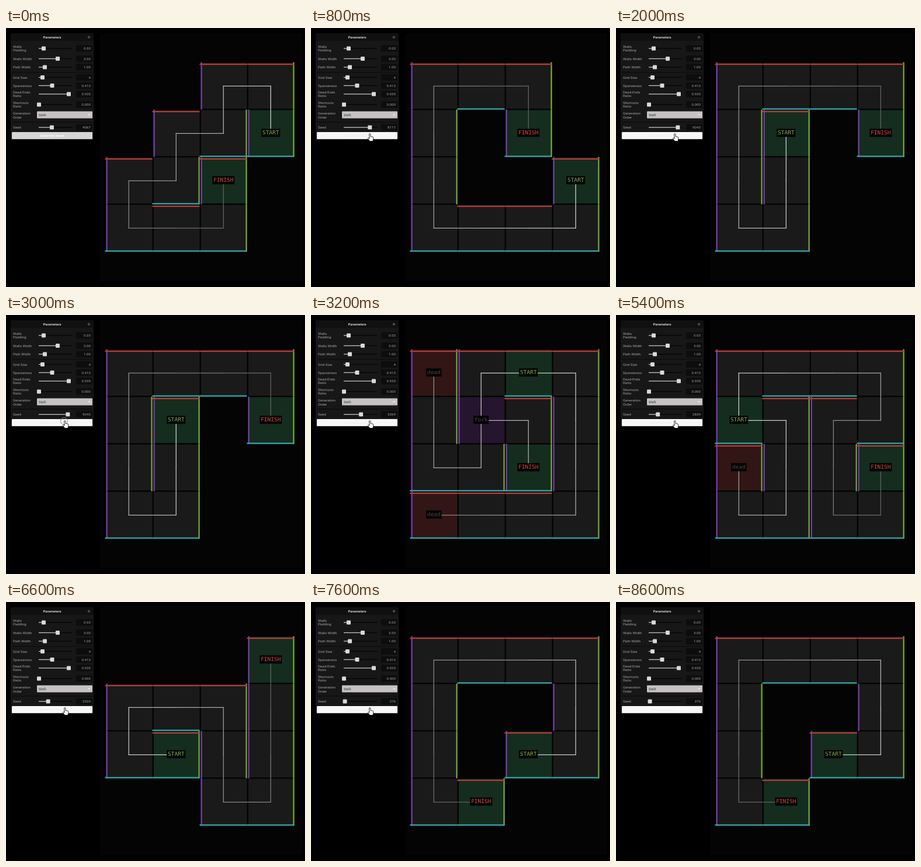
Recreate the animation shown at these times as an HTML page with a canvas. Size 512 px wide and 443 px high, loop 8800 ms.

```html
<!DOCTYPE html>
<html lang="en">
<head>
<meta charset="utf-8">
<title>Maze generator</title>
<style>
html, body { margin: 0; width: 100%; height: 100%; overflow: hidden; background: #000; }
canvas { display: block; }
</style>
</head>
<body>
<canvas id="stage" width="512" height="443"></canvas>
<script>
const ctx = document.getElementById('stage').getContext('2d');
const LOOP = 8800, PITCH = 81;
const STEP = { U: [0, -1], R: [1, 0], D: [0, 1], L: [-1, 0] };
const SANS = 'Roboto, "Liberation Sans", sans-serif';
const MONO = '"DejaVu Sans Mono", monospace';
const TINT = { START: '#142d1f', FINISH: '#142d1f', dead: '#311615', fork: '#26152f' };
const INK = { START: '#82b33e', FINISH: '#d84b32', dead: '#484848', fork: '#484848' };

// Each route: column, row, moves, label at its end, depth of its first cell
const MAZES = [
  { at: 0, seed: 4067, routes: [[3, 1, 'ULDLDLDRRU', 'FINISH', 0]] },
  { at: 800, seed: 8117, routes: [[3, 2, 'DLLLUUURRD', 'FINISH', 0]] },
  { at: 2000, seed: 9043, routes: [[1, 1, 'DDLUUURRRD', 'FINISH', 0]] },
  { at: 3200, seed: 5369, fork: '1,1', routes: [
    [2, 0, 'LDRD', 'FINISH', 0], [1, 1, 'DLUU', 'dead', 2], [2, 0, 'RDDDLLL', 'dead', 0]] },
  { at: 4200, seed: 6217, routes: [[1, 1, 'RULLDDRDRR', 'FINISH', 0]] },
  { at: 5400, seed: 2839, routes: [
    [0, 1, 'URRRDLDDRU', 'FINISH', 0], [0, 1, 'RDDLU', 'dead', 0]] },
  { at: 6600, seed: 2924, routes: [[1, 2, 'LURRDDRUUU', 'FINISH', 0]] },
  { at: 7600, seed: 376, routes: [[2, 2, 'RUULLLDDDR', 'FINISH', 0]] }
].map(carve);

// time, kind, tip x, tip y
const POINTER = [
  [0], [200, 'hand', 129, 188], [400, 'hand', 101, 180], [600, 'hand', 100, 181],
  [7800, 'hand', 102, 181], [8000, 'arrow', 456, 346], [8200, 'arrow', 471, 396],
  [8400, 'arrow', 492, 436], [8600]
];
const CLICKS = [1800, 3000, 4000, 5200, 6400];

const SLIDERS = [
  [35, 64.5, '0.03', 'Walls', 'Padding'], [52.5, 88.5, '3.00', 'Walls Width'],
  [67, 66.5, '1.00', 'Path Width'], [84.5, 62.5, '4', 'Grid Size'],
  [98.5, 79, '0.413', 'Sparseness'], [113, 107.5, '0.935', 'Dead-Ends', 'Ratio'],
  [131, 56.5, '0.000', 'Shortcuts', 'Ratio']
];

function carve({ at, seed, fork, routes }) {
  const cells = new Map(), lines = [];
  const cell = (x, y) => {
    const key = x + ',' + y;
    if (!cells.has(key)) cells.set(key, { x, y, open: '', label: '' });
    return cells.get(key);
  };
  for (const [sx, sy, moves, end, first] of routes) {
    let here = cell(sx, sy), depth = first;
    if (!depth) here.label = 'START';
    for (const m of moves) {
      const next = cell(here.x + STEP[m][0], here.y + STEP[m][1]);
      here.open += m;
      next.open += 'DLUR'['URDL'.indexOf(m)];
      lines.push([here, next, depth++]);
      here = next;
    }
    here.label = end;
  }
  if (fork) cells.get(fork).label = 'fork';
  return { at, seed, cells: [...cells.values()], lines };
}

function box(x, y, w, h, color) {
  ctx.fillStyle = color;
  ctx.fillRect(x, y, w, h);
}

function rounded(x, y, w, h, r, color) {
  ctx.fillStyle = color;
  ctx.beginPath();
  ctx.roundRect(x, y, w, h, r);
  ctx.fill();
}

function text(str, x, y, color, font, align = 'left') {
  ctx.font = font;
  ctx.fillStyle = color;
  ctx.textAlign = align;
  ctx.fillText(str, x, y);
}

function drawMaze({ cells, lines }) {
  box(161, 9, 346, 424, '#040404');
  for (const { x, y, label } of cells)
    box(172 + x * PITCH, 59.5 + y * PITCH, 78.5, 78.5, TINT[label] || '#1a1a1a');

  for (const { x, y, open } of cells) {
    const left = 169.5 + x * PITCH, top = 58.5 + y * PITCH;
    if (!open.includes('L')) box(left + 2, top, 2.2, PITCH, '#7d3fb4');
    if (!open.includes('R')) box(left + 79, top, 2.2, PITCH, '#78ab38');
    if (!open.includes('U')) box(left, top + 2.4, PITCH, 2.2, '#b83a37');
    if (!open.includes('D')) box(left, top + 78.9, PITCH, 2.2, '#36adaf');
  }

  const px = c => 210.3 + c.x * PITCH, py = c => 99.3 + c.y * PITCH;
  ctx.lineWidth = 1.3;
  ctx.lineCap = 'square';
  for (const [a, b, depth] of lines) {
    const g = 205 - depth * 12;
    ctx.strokeStyle = `rgb(${g},${g},${g})`;
    ctx.beginPath();
    ctx.moveTo(px(a), py(a));
    ctx.lineTo(px(b), py(b));
    ctx.stroke();
  }

  for (const c of cells.filter(c => c.label)) {
    const w = c.label.length * 5.72 + 3.5;
    box(px(c) - w / 2, py(c) - 8, w, 14, '#040404');
    text(c.label, px(c), py(c) + 1.6, INK[c.label], '9.5px ' + MONO, 'center');
  }
}

function drawSlider([y, knob, value, ...names]) {
  names.forEach((n, i) =>
    text(n, 12, y + 2.3 + (i - (names.length - 1) / 2) * 6.3, '#a2a2a2', '6.2px ' + SANS));
  box(56, y - 0.7, 57, 1.4, '#050505');
  box(56, y - 0.7, knob - 56, 1.4, '#bcbcbc');
  rounded(knob - 3.5, y - 3.5, 7, 7, 1.2, '#d9d9d9');
  rounded(120, y - 5.5, 28, 11, 1, '#0d0d0d');
  text(value, 145, y + 2.4, '#a2a2a2', '6.2px ' + SANS, 'right');
}

function drawPanel(seed, lit) {
  rounded(8, 9, 142, 183, 2, '#171717');
  rounded(8, 9, 142, 13, 2, '#101010');
  text('Parameters', 79, 18, '#ededed', '500 6px ' + SANS, 'center');
  ctx.strokeStyle = '#777';
  ctx.lineWidth = 1;
  ctx.beginPath();
  ctx.arc(142, 15.8, 1.5, 0, 7);
  ctx.stroke();

  box(10, 75.5, 138, 1, '#0a0a0a');
  box(10, 160.5, 138, 1, '#0a0a0a');
  SLIDERS.forEach(drawSlider);
  drawSlider([170, 56 + seed * 0.00552, String(seed), 'Seed']);

  text('Generation', 12, 148.2, '#a2a2a2', '6.2px ' + SANS);
  text('Order', 12, 154.5, '#a2a2a2', '6.2px ' + SANS);
  rounded(53, 142.5, 95, 12, 1, '#c6c2c3');
  text('Shift', 56, 150.8, '#333', '6.2px ' + SANS);
  ctx.fillStyle = '#eee';
  ctx.beginPath();
  ctx.moveTo(140, 147.5);
  ctx.lineTo(145, 147.5);
  ctx.lineTo(142.5, 150);
  ctx.fill();

  rounded(10, 178, 138, 12, 1, lit ? '#f7f7f7' : '#d6d6d6');
  text('Generate maze', 79, 186.3, lit ? '#eee' : '#fff', '500 6.2px ' + SANS, 'center');
}

const HAND = new Path2D('M0 0Q1.4-1 2 .4V4.5L6 5.3Q7 5.6 6.8 7L6 12.5H.8L-2.4 8.2Q-2.6 6.8-1.2 6.8L0 7.8Z');
const ARROW = new Path2D('M0 0V9.3L2.2 7.4L3.7 10.7L5.1 10.1L3.6 6.9H6.6Z');

function drawPointer([, kind, x, y], clicking) {
  if (!kind) return;
  if (clicking) {
    ctx.strokeStyle = '#888';
    ctx.lineWidth = 1;
    ctx.beginPath();
    ctx.arc(99.5, 181.5, 6, 0, 7);
    ctx.stroke();
  }
  ctx.save();
  ctx.translate(x, y);
  ctx.fillStyle = '#fff';
  ctx.strokeStyle = '#222';
  ctx.lineWidth = 0.9;
  const shape = kind === 'hand' ? HAND : ARROW;
  ctx.fill(shape);
  ctx.stroke(shape);
  ctx.restore();
}

function draw(now) {
  const t = now % LOOP;
  const maze = MAZES.findLast(m => t >= m.at);
  box(0, 0, 512, 443, '#000');
  drawMaze(maze);
  drawPanel(maze.seed, t >= 400);
  drawPointer(POINTER.findLast(p => t >= p[0]), CLICKS.some(c => t >= c && t < c + 200));
  requestAnimationFrame(() => draw(performance.now() - start));
}

const start = performance.now();
draw(0);
</script>
</body>
</html>
```
